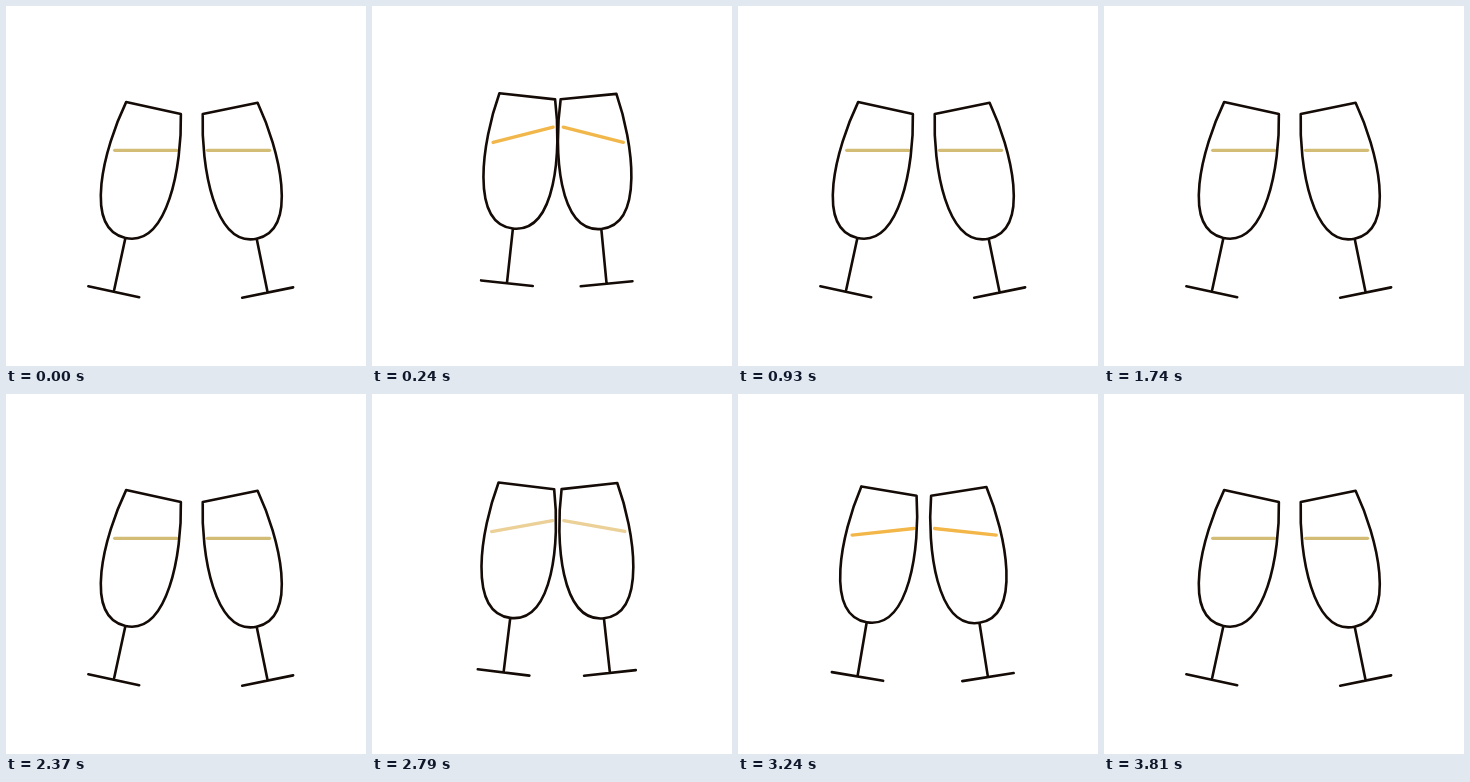
An HTML page that plays this animation: 360x360 px, repeating every 4500 ms.

```html
<!DOCTYPE html>
<html lang="en">
<head>
<meta charset="utf-8">
<title>Clinking glasses</title>
<style>
  html, body { margin: 0; width: 100%; height: 100%; overflow: hidden; background: #fff; }
  svg { display: block; width: 100vw; height: 100vh; }
  path { fill: none; stroke-linecap: round; stroke-linejoin: round; }
  .glass { stroke: #140b06; stroke-width: 2.6; }
  .drink { stroke-width: 3.3; }
</style>
</head>
<body>
<svg viewBox="0 0 360 360">
  <defs>
    <path id="outline" class="glass" transform="translate(147.5 102) rotate(12.2)"
      d="M-28 0H28C40 50 43.5 133 0 133S-40 50-28 0ZM0 133V188M-26 188H26"/>
  </defs>
  <g class="swing">
    <path class="drink" d="M0 0H62"/>
    <use href="#outline"/>
  </g>
  <g transform="rotate(.7 197 108) translate(371.6 0) scale(-1 1)">
    <g class="swing">
      <path class="drink" d="M0 0H62"/>
      <use href="#outline"/>
    </g>
  </g>
</svg>
<script>
  const LOOP = 4500, STEP = 30;
  const CLINKS = [0, 2690];
  const HIT = 133, PART = 165, REST = 855;
  const TILT = 6.2, SLOSH = 8.6;

  // Outer end of each drink line and its resting angle
  const LEVELS = [[108.7, 144.3, 0], [107.6, 143.5, 0.7]];
  const TINTS = [
    [0, [211, 188, 118]],
    [100, [235, 208, 152]],
    [250, [242, 181, 68]],
    [700, [243, 184, 76]],
    [REST, [211, 188, 118]]
  ];

  const swings = document.querySelectorAll('.swing');
  const drinks = document.querySelectorAll('.drink');

  const ease = (t, from, to) => {
    const x = Math.min(1, Math.max(0, (t - from) / (to - from)));
    return x * x * (3 - 2 * x);
  };

  const pulse = (t, start) => ease(t, start, HIT) - ease(t, PART, REST);

  function tint(t) {
    const next = TINTS.findIndex(([time]) => time > t);
    if (next < 0) return `rgb(${TINTS[0][1]})`;
    const [t0, from] = TINTS[next - 1], [t1, to] = TINTS[next];
    const k = (t - t0) / (t1 - t0);
    return `rgb(${from.map((c, i) => Math.round(c + (to[i] - c) * k))})`;
  }

  function draw(now) {
    const time = Math.floor((now % LOOP) / STEP) * STEP;
    const t = time - (time < CLINKS[1] ? CLINKS[0] : CLINKS[1]);
    const swing = pulse(t, 0) * TILT;
    const slosh = pulse(t, 60) * SLOSH;
    swings.forEach(g => g.setAttribute('transform', `rotate(${-swing} 40 22)`));
    drinks.forEach((line, i) => {
      const [x, y, angle] = LEVELS[i];
      line.setAttribute('transform', `translate(${x} ${y}) rotate(${angle - slosh})`);
      line.setAttribute('stroke', tint(t));
    });
  }

  const begin = performance.now();
  function tick() {
    draw(performance.now() - begin);
    requestAnimationFrame(tick);
  }
  tick();
</script>
</body>
</html>
```
